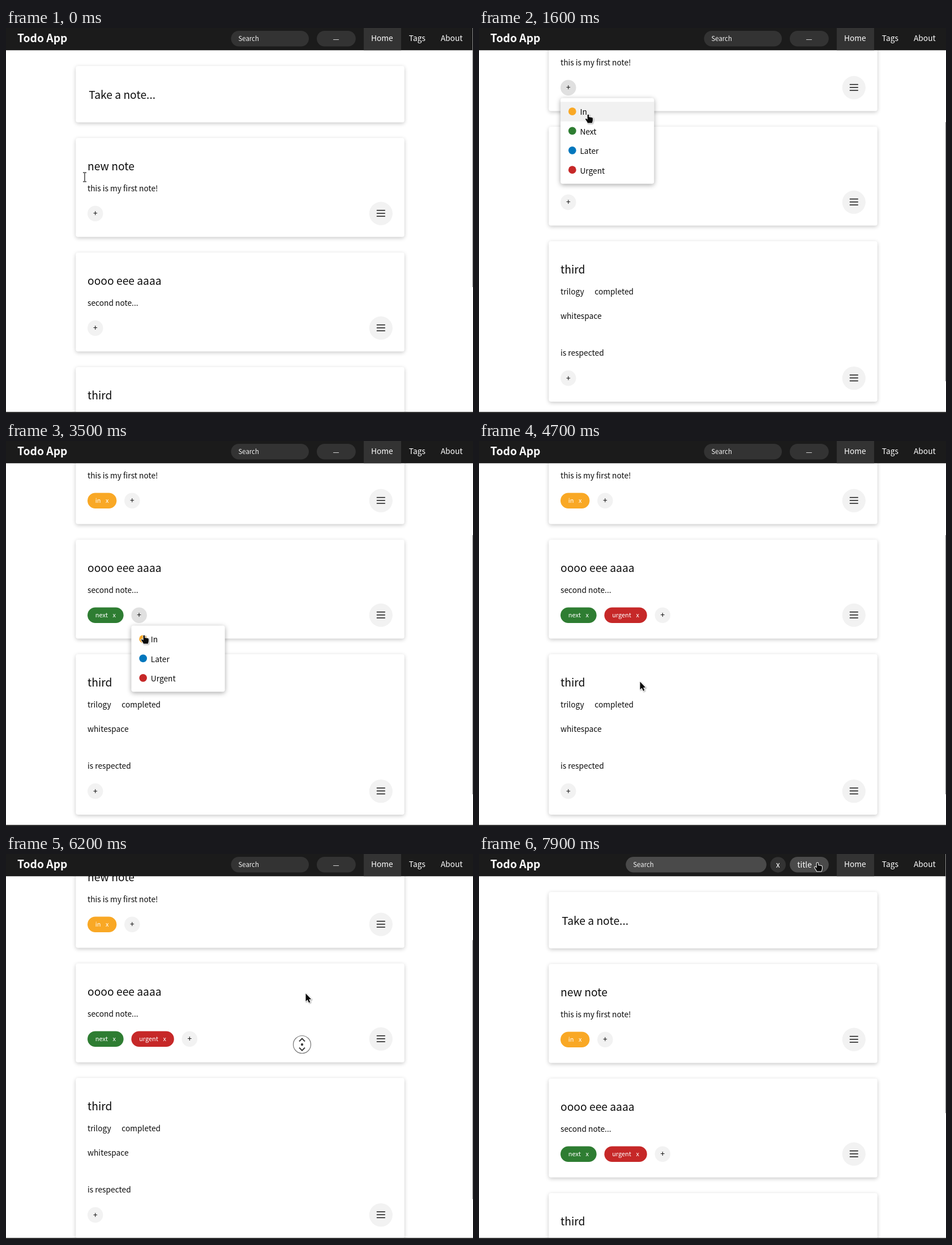
Write an HTML page with a canvas that moves like this. It is 825 px wide and 679 px high and loops after 8000 ms.

```html
<!DOCTYPE html>
<html lang="en">
<head>
<meta charset="utf-8">
<title>Todo App</title>
<style>
  html, body { margin: 0; width: 100%; height: 100%; overflow: hidden; background: #fff; }
  canvas { display: block; width: 825px; height: 679px; }
</style>
</head>
<body>
<canvas id="stage" width="825" height="679"></canvas>
<script>
const ctx = document.getElementById('stage').getContext('2d');
const LOOP = 8000, STEP = 100, REM = 13.75;
const FAMILY = '"Noto Sans CJK SC", "Noto Sans CJK JP", "Noto Sans CJK", "Noto Sans", sans-serif';
const COLORS = { In: '#f9a825', Next: '#2e7d32', Later: '#0277bd', Urgent: '#c62828' };

const NOTES = [
  { y: 194, title: 'new note', lines: [[0, 0, 'this is my first note!']], extra: 0 },
  { y: 396, title: 'oooo eee aaaa', lines: [[0, 0, 'second note...']], extra: 0 },
  { y: 598, title: 'third', extra: 108.4, lines: [
    [0, 0, 'trilogy'], [60.3, 0, 'completed'], [0, 43.4, 'whitespace'], [0, 108.4, 'is respected']] }
];
const TAGGED = [[1800, 0, 'In'], [2900, 1, 'Next'], [4600, 1, 'Urgent']];
const MENUS = [[1300, 1800, 0], [2300, 2900, 1], [3500, 4600, 1]];
const RINGS = [[300, 700, 54, 220], [5900, 6800, 523, 336]];

const SCROLL = [[300, 0], [400, 24], [500, 95], [600, 180], [700, 222], [6000, 222],
  [6200, 203], [6300, 180], [6400, 148], [6600, 62], [6700, 16], [6800, 0]];

// time, x, y, shape
const POINTER = [
  [0, 139, 263, 'beam'], [100, 112, 250, 'arrow'], [200, 58, 221, 'arrow'], [300, 54, 222, 'arrow'],
  [500, 60, 268, 'arrow'], [600, 64, 297, 'arrow'], [700, 68, 285, 'arrow'], [800, 112, 180, 'arrow'],
  [900, 157, 88, 'hand'], [1000, 158, 97, 'hand'], [1100, 160, 106, 'hand'], [1300, 160, 107, 'hand'],
  [1500, 184, 142, 'hand'], [1600, 193, 152, 'hand'], [1800, 190, 156, 'hand'], [1900, 182, 190, 'arrow'],
  [2100, 162, 278, 'arrow'], [2200, 158, 300, 'hand'], [2300, 160, 312, 'hand'], [2400, 169, 353, 'hand'],
  [2600, 169, 353, 'hand'], [2700, 184, 387, 'hand'], [2800, 184, 387, 'hand'], [2900, 190, 376, 'arrow'],
  [3100, 222, 326, 'arrow'], [3200, 234, 312, 'hand'], [3300, 236, 311, 'hand'], [3400, 236, 311, 'hand'],
  [3500, 244, 342, 'hand'], [3900, 255, 395, 'hand'], [4200, 258, 414, 'hand'], [4500, 258, 414, 'hand'],
  [4600, 262, 418, 'arrow'], [5100, 372, 446, 'arrow'], [5200, 372, 446, 'arrow'], [5700, 518, 345, 'arrow'],
  [5900, 523, 334, 'arrow'], [6000, 523, 305, 'arrow'], [6300, 532, 215, 'arrow'], [6700, 548, 118, 'arrow'],
  [6900, 558, 80, 'arrow'], [7000, 566, 62, 'arrow'], [7100, 588, 27, 'hand'], [7200, 598, 15, 'hand']
];

const clamp = (v, a = 0, b = 1) => Math.min(b, Math.max(a, v));

function sample(keys, t) {
  let i = 0;
  while (i < keys.length - 1 && keys[i + 1][0] <= t) i++;
  const a = keys[i], b = keys[i + 1] || a;
  const k = b === a ? 0 : clamp((t - a[0]) / (b[0] - a[0]));
  return a.slice(1).map((v, n) => typeof v === 'number' ? v + (b[n + 1] - v) * k : v);
}

function text(str, x, y, size = REM, color = '#0c0c0c', align = 'left', weight = 400) {
  ctx.font = `${weight} ${size}px ${FAMILY}`;
  ctx.fillStyle = color;
  ctx.textAlign = align;
  ctx.fillText(str, x, y);
}

function box(x, y, w, h, r, color) {
  ctx.fillStyle = color;
  ctx.beginPath();
  ctx.roundRect(x, y, w, h, r);
  ctx.fill();
}

function disc(x, y, r, color) {
  ctx.fillStyle = color;
  ctx.beginPath();
  ctx.arc(x, y, r, 0, 7);
  ctx.fill();
}

function line(points, color, width) {
  ctx.strokeStyle = color;
  ctx.lineWidth = width;
  ctx.beginPath();
  points.forEach(([x, y], i) => i ? ctx.lineTo(x, y) : ctx.moveTo(x, y));
  ctx.stroke();
}

function panel(x, y, w, h, blur, alpha) {
  ctx.save();
  ctx.shadowColor = `rgba(0,0,0,${alpha})`;
  ctx.shadowBlur = blur;
  ctx.shadowOffsetY = 2;
  box(x, y, w, h, 4, '#fff');
  ctx.restore();
}

function chip(x, y, name) {
  const label = name.toLowerCase();
  ctx.font = `11px ${FAMILY}`;
  const w = ctx.measureText(label).width + 41.6;
  box(x, y - REM, w, 2 * REM, REM, COLORS[name]);
  text(label, x + REM, y + 4, 11, '#fff');
  text('x', x + w - REM - 5.5, y + 4, 11, '#fff');
  return x + w + REM;
}

// Draws a note and returns the left edge and centre of its plus button.
function note(n, tags, scroll, open, mouse) {
  const y = n.y - scroll, mid = y + 133.2 + n.extra;
  panel(123.3, y, 580.5, 174.6 + n.extra, 7, 0.22);
  text(n.title, 144, y + 57, 19.25);
  n.lines.forEach(([dx, dy, s]) => text(s, 144 + dx, y + 94 + dy));
  let x = 144;
  tags.forEach(tag => { x = chip(x, mid, tag); });
  const hover = Math.hypot(mouse[0] - x - REM, mouse[1] - mid) < REM;
  disc(x + REM, mid, REM, open || hover ? '#e0e0e0' : '#f2f2f2');
  text('+', x + REM, mid + 5, REM, '#0c0c0c', 'center');
  disc(662.3, mid, 20.6, '#f2f2f2');
  for (const dy of [-5.2, 0, 5.2]) line([[654.8, mid - 0.4 + dy], [669.8, mid - 0.4 + dy]], '#151515', 1.5);
  return [x, mid];
}

function menu(x, mid, items, mouse) {
  const y = mid + 18.2, row = 2.5 * REM;
  panel(x, y, 165.3, items.length * row + REM, 8, 0.35);
  items.forEach((name, i) => {
    const top = y + REM / 2 + i * row;
    const inside = mouse[0] > x && mouse[0] < x + 165 && mouse[1] >= top && mouse[1] < top + row;
    if (inside) box(x, top, 165.3, row, 0, '#f1f1f1');
    disc(x + 20.8, top + row / 2 - 0.4, REM / 2, COLORS[name]);
    text(name, x + 34.4, Math.round(top + row / 2 + 6));
  });
}

function header(t, mouse) {
  const active = t >= 7600;
  const k = 1 - Math.pow(1 - clamp((t - 7500) / 400), 2);
  const hover = mouse[0] > 549 && mouse[1] < 33;
  box(0, 0, 825, 39.3, 0, '#1b1b1b');
  text('Todo App', 20, 25, 19.25, '#fff', 'left', 700);

  const width = active ? 137.5 + 111 * k : 137.5;
  const right = active ? 507.8 : 535;
  const left = right - width;
  box(left, 5, width, 27.6, REM, active ? '#4a4a4a' : '#333');
  text('Search', left + 13, 23, 11.4, '#f2f2f2');
  if (active) {
    disc(528.2, 18.9, REM, '#333');
    text('x', 528.2, 23.5, REM, '#fff', 'center');
  }
  box(549, 5, 68.8, 27.6, REM, hover ? '#4a4a4a' : '#333');
  if (active) text('title', 562.2, 24, REM, '#fff');
  else text('—', 583, 24, 12.5, '#fff', 'center');

  box(632, 0, 66, 39.3, 0, '#333');
  text('Home', 645, 23, REM, '#fff');
  text('Tags', 711.8, 23, REM, '#fff');
  text('About', 768, 23, REM, '#fff');
}

function ring(x, y) {
  disc(x, y, 15.5, '#fff');
  ctx.strokeStyle = '#777';
  ctx.lineWidth = 1.2;
  ctx.stroke();
  for (const s of [-1, 1]) line([[x - 5, y + 5.5 * s], [x, y + 10.5 * s], [x + 5, y + 5.5 * s]], '#3c3c3c', 2);
  disc(x, y, 2.2, '#3c3c3c');
}

function outlined(path, x, y) {
  ctx.save();
  ctx.translate(x, y);
  ctx.lineJoin = 'round';
  ctx.strokeStyle = '#fff';
  ctx.lineWidth = 2;
  ctx.shadowColor = 'rgba(0,0,0,.35)';
  ctx.shadowBlur = 2;
  ctx.shadowOffsetX = ctx.shadowOffsetY = 1;
  ctx.stroke(path);
  ctx.shadowColor = 'transparent';
  ctx.fillStyle = '#0a0a0a';
  ctx.fill(path);
  ctx.restore();
}

const ARROW = new Path2D('M.5 1V15L3.7 12L6 17.2L8.4 16.2L6.2 11.2H10.3Z');
const HAND = new Path2D('M-1.4 1.2Q0 -.4 1.2 1.2V5L7 6Q8 6.4 8 8V11Q7.6 13 6.8 15.5H-1.2' +
  'Q-1.6 13.6 -3.4 11.6L-5 9Q-5 7.6 -3.6 7.8L-1.4 9.4Z');

function pointer([x, y, shape]) {
  if (shape === 'beam') {
    const bars = [[[x, y - 7], [x, y + 7]], [[x - 3, y - 8], [x + 3, y - 8]], [[x - 3, y + 8], [x + 3, y + 8]]];
    bars.forEach(b => line(b, '#fff', 3));
    bars.forEach(b => line(b, '#111', 1.2));
  } else {
    outlined(shape === 'hand' ? HAND : ARROW, x, y);
  }
}

function draw(t) {
  const [scroll] = sample(SCROLL, t);
  const mouse = sample(POINTER, Math.max(0, t - STEP));
  const open = MENUS.find(m => t >= m[0] && t < m[1]);
  const tagsOf = i => TAGGED.filter(g => g[1] === i && t >= g[0]).map(g => g[2]);

  box(0, 0, 825, 679, 0, '#fff');
  panel(123.3, 67 - scroll, 580.5, 99.5, 7, 0.22);
  text('Take a note...', 146.2, 125 - scroll, 19.25);
  const spots = NOTES.map((n, i) => note(n, tagsOf(i), scroll, open && open[2] === i, mouse));
  if (open) {
    const used = tagsOf(open[2]);
    menu(...spots[open[2]], Object.keys(COLORS).filter(c => !used.includes(c)), mouse);
  }
  header(t, t >= 7100 ? sample(POINTER, t) : mouse);
  box(824, scroll * 0.748, 1, 457, 0, '#8a8a8a');
  box(0, 677, 825, 2, 0, '#333');
  RINGS.filter(r => t >= r[0] && t < r[1]).forEach(r => ring(r[2], r[3]));
  pointer(sample(POINTER, t));
}

function tick() {
  const t = performance.now() % LOOP;
  draw(Math.floor(t / STEP) * STEP);
  requestAnimationFrame(tick);
}
tick();
</script>
</body>
</html>
```
